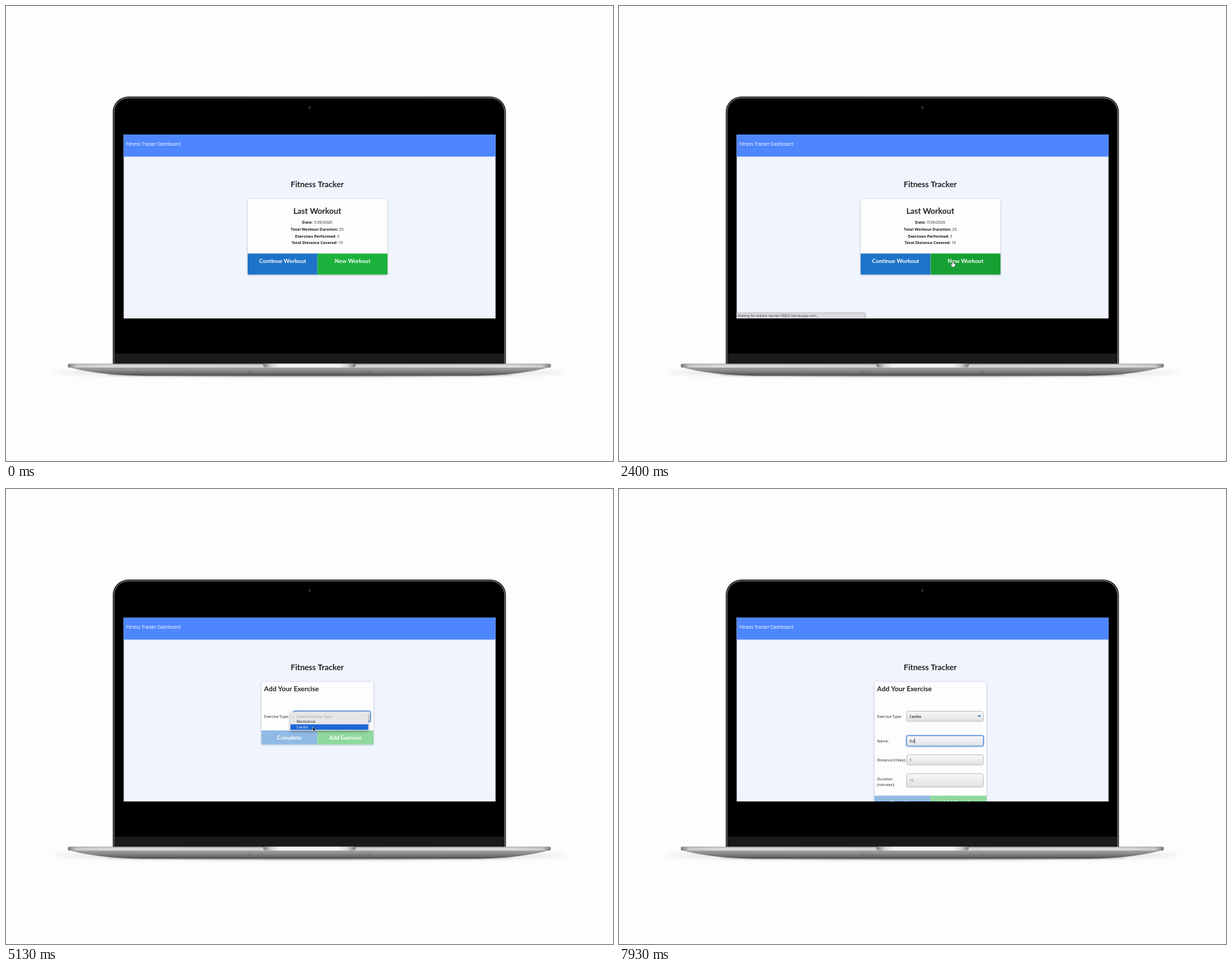
These frames come from a looping animation (864 px wide and 648 px high, 8 s). An HTML page with a canvas:

```html
<!DOCTYPE html>
<html lang="en">
<head>
<meta charset="utf-8">
<title>Fitness Tracker</title>
<style>
html, body { margin: 0; width: 100%; height: 100%; overflow: hidden; background: #fdfcfe; }
canvas { display: block; width: 864px; height: 648px; }
</style>
</head>
<body>
<canvas id="stage" width="864" height="648"></canvas>
<script>
const ctx = document.getElementById('stage').getContext('2d');
const LOOP = 8000;
const HEAD = 'Lato, sans-serif';
const BODY = '"Open Sans", sans-serif';
const HOST = 'radiant-hamlet-39822.herokuapp.com';

// Moments of the story in ms
const T = { enter: 70, hover: 470, link: 930, wait: 2000, page: 2670, fade: 3850, gone: 4250,
  open: 4470, pick: 5300, focus: 6600, type: 7250, second: 7530 };

// Pointer path: start, end, from, to
const MOVES = [
  [70, 600, [674, 419], [475, 364]],
  [3000, 3800, [475, 364], [478, 324]],
  [4540, 5060, [478, 324], [437, 339]],
  [5480, 6270, [437, 339], [441, 356]]
];

const ease = p => p * p * (3 - 2 * p);
const clamp = v => Math.min(1, Math.max(0, v));

function pointerAt(t) {
  let pos = MOVES[0][2];
  for (const [start, end, from, to] of MOVES) {
    if (t < start) break;
    const p = ease(clamp((t - start) / (end - start)));
    pos = from.map((v, i) => v + (to[i] - v) * p);
  }
  return pos;
}

function rect(x, y, w, h, fill) {
  ctx.fillStyle = fill;
  ctx.fillRect(x, y, w, h);
}

function round(x, y, w, h, r, fill, stroke, line = 1) {
  ctx.beginPath();
  ctx.roundRect(x, y, w, h, r);
  if (fill) { ctx.fillStyle = fill; ctx.fill(); }
  if (stroke) { ctx.strokeStyle = stroke; ctx.lineWidth = line; ctx.stroke(); }
}

function ramp(x0, y0, x1, y1, ...stops) {
  const g = ctx.createLinearGradient(x0, y0, x1, y1);
  stops.forEach(([at, color]) => g.addColorStop(at, color));
  return g;
}

function text(str, x, y, font, color = '#222', align = 'left') {
  ctx.font = font;
  ctx.fillStyle = color;
  ctx.textAlign = align;
  ctx.fillText(str, x, y);
}

const heading = (str, x, y, size, color, align) => text(str, x, y, `bold ${size}px ${HEAD}`, color, align);
const label = (str, x, y, color = '#222') => text(str, x, y, `500 5.4px ${BODY}`, color);

function drawLid() {
  round(152, 129, 559.5, 381, [22, 22, 0, 0], '#0c0e0d');
  round(153.7, 130.8, 556.1, 381, [20.4, 20.4, 0, 0], '#000', '#b9c1bd', .8);
  rect(155, 495, 553.5, 15, '#1b1a1b');
  ctx.beginPath();
  ctx.arc(432, 144.5, 2, 0, 7);
  ctx.fillStyle = '#29292c';
  ctx.fill();
}

function drawShadow(rx, y, ry, blur, alpha) {
  ctx.save();
  ctx.filter = `blur(${blur}px)`;
  ctx.beginPath();
  ctx.ellipse(432, y, rx, ry, 0, 0, 7);
  ctx.fillStyle = `rgba(0,0,0,${alpha})`;
  ctx.fill();
  ctx.restore();
}

function drawBase() {
  drawShadow(365, 522, 4, 3, .14);
  drawShadow(290, 524.5, 3, 1.6, .45);

  ctx.beginPath();
  ctx.moveTo(88, 514);
  ctx.bezierCurveTo(112, 521, 150, 526.5, 205, 526.5);
  ctx.lineTo(658, 526.5);
  ctx.bezierCurveTo(714, 526.5, 750, 521, 775.5, 514);
  ctx.closePath();
  ctx.fillStyle = ramp(0, 514, 0, 527, [0, '#a6a6a7'], [.4, '#8b8b8c'], [.75, '#666667'], [1, '#424243']);
  ctx.fill();

  round(88, 509.8, 687.5, 5.2, [1, 1, 2, 2], ramp(88, 0, 775.5, 0, [0, '#777'], [.018, '#c8c8c9'],
    [.08, '#d9d9da'], [.5, '#d0d0d1'], [.92, '#d9d9da'], [.982, '#c8c8c9'], [1, '#777']));
  rect(90, 509.6, 684, .8, '#8d8d8e');
  round(366, 509.5, 132, 5.3, [0, 0, 4, 4], ramp(366, 0, 498, 0, [0, '#777'], [.09, '#d5d5d5'],
    [.18, '#f4f4f4'], [.82, '#f4f4f4'], [.91, '#d5d5d5'], [1, '#777']));
  rect(345, 520, 5, 1, '#666667');
  rect(514, 520, 5, 1, '#666667');
}

function drawCard(x, y, w, h) {
  ctx.save();
  ctx.shadowColor = 'rgba(40,50,70,.4)';
  ctx.shadowBlur = 2.5;
  ctx.shadowOffsetY = .5;
  round(x, y, w, h, 1.5, '#fdfcfe');
  ctx.restore();
}

function drawButtons(x, y, w, h, base, names, colors) {
  names.forEach((name, i) => {
    rect(x + i * w / 2, y, w / 2, h, colors[i]);
    heading(name, x + (i + .5) * w / 2, base, 8.1, '#fff', 'center');
  });
}

function drawStat(name, value, y) {
  const bold = `bold 5.6px ${BODY}`, plain = `500 5.6px ${BODY}`;
  ctx.font = bold;
  const nameWidth = ctx.measureText(name).width;
  ctx.font = plain;
  const x = 443 - (nameWidth + ctx.measureText(' ' + value).width) / 2;
  text(name, x, y, bold, '#1c1c1e');
  text(' ' + value, x + nameWidth, y, plain, '#222');
}

function drawSummary(t) {
  drawCard(344, 274.5, 199, 108);
  heading('Last Workout', 443, 296, 11.3, '#222', 'center');
  [['Date:', '7/29/2020'], ['Total Workout Duration:', '25'],
    ['Exercises Performed:', '3'], ['Total Distance Covered:', '15']]
    .forEach(([name, value], i) => drawStat(name, value, 310.4 + i * 9.6));
  drawButtons(344, 352.5, 199, 30, 366.3, ['Continue Workout', 'New Workout'],
    ['#1d73c7', t >= T.hover ? '#16a034' : '#1cb13d']);
}

function drawField(y, h, focused) {
  if (focused) round(409, y, 110, h, 2.5, null, 'rgba(90,155,235,.6)', 2);
  round(409.5, y + .5, 109, h - 1, 2,
    ramp(0, y, 0, y + h, [0, '#f8f8f9'], [.5, '#ededef'], [1, '#dfdfe2']), focused ? '#4f88cc' : '#b7b7bc', .8);
}

function drawSelect(value, focused) {
  drawField(316, 15.5, focused);
  text(value, 413.5, 325.6, `600 5.3px ${BODY}`, '#222');
  ctx.beginPath();
  ctx.moveTo(510.5, 322.3);
  ctx.lineTo(515.3, 322.3);
  ctx.lineTo(512.9, 325);
  ctx.fillStyle = '#2f64ad';
  ctx.fill();
}

function drawMenu(t) {
  ctx.save();
  ctx.shadowColor = 'rgba(0,0,0,.4)';
  ctx.shadowBlur = 4;
  ctx.shadowOffsetY = 1;
  round(405, 318, 110.5, 26, 1.5, '#e6e6e8');
  ctx.restore();
  const row = t < 4680 ? 0 : t < 4870 ? 1 : 2;
  if (row) rect(405, 327.4 + (row - 1) * 7.8, 110.5, 7.8, '#1c66d6');
  label('✓', 407, 325.6, '#a2a2a6');
  label('Select Exercise Type', 413.5, 325.6, '#a2a2a6');
  label('Resistance', 413.5, 333.2, row === 1 ? '#fff' : '#222');
  label('Cardio', 413.5, 340.9, row === 2 ? '#fff' : '#222');
}

function drawDetails(t) {
  const focused = t >= T.focus;
  const typed = t >= T.second ? 'Ru' : t >= T.type ? 'R' : '';
  label('Name:', 367.3, 360.8);
  drawField(351, 15.5, focused);
  label(typed || 'Running', 413.5, 360.8, typed ? '#222' : '#75757a');
  if (focused) {
    const caret = 413.7 + ctx.measureText(typed).width;
    rect(caret, 355.2, .8, 7, '#222');
  }
  label('Distance (miles):', 367.3, 387.9);
  drawField(378, 15.5);
  label('5', 413.5, 387.9, '#75757a');
  label('Duration', 367.3, 415.4);
  label('(minutes):', 367.3, 423);
  drawField(405, 20);
  label('10', 413.5, 417, '#75757a');
}

function drawForm(t) {
  const full = t >= T.pick;
  const top = full ? 436.7 : 343.8;
  drawCard(363.5, 274.5, 159.5, top + 20 - 274.5);
  heading('Add Your Exercise', 367.3, 288.3, 9.7);
  label('Exercise Type:', 367.3, 325.7);
  drawSelect(full ? 'Cardio' : 'Select Exercise Type', t >= T.open && t < T.focus);
  if (full) drawDetails(t);
  drawButtons(363.5, top, 159.5, 20, top + 13.2, ['Complete', 'Add Exercise'], ['#90bae3', '#8fd99e']);
  if (t >= T.open && !full) drawMenu(t);
}

function drawStatus(t) {
  if (t < T.link || t >= T.gone) return;
  const waiting = t >= T.wait;
  ctx.save();
  ctx.globalAlpha = clamp((t - T.link) / 130 + .3) * clamp((T.gone - t) / (T.gone - T.fade));
  round(166, 437, waiting ? 184.7 : 129.5, 10, [0, 2, 0, 0], '#dcdde1', '#aeb1b8', .9);
  text(waiting ? `Waiting for ${HOST}...` : `https://${HOST}/exercise`, 169, 443,
    `${waiting ? 4.85 : 5}px ${BODY}`, '#444');
  ctx.restore();
}

function outline(points, fill, stroke) {
  ctx.beginPath();
  points.forEach(([x, y]) => ctx.lineTo(x, y));
  ctx.closePath();
  ctx.lineJoin = 'round';
  ctx.strokeStyle = stroke;
  ctx.lineWidth = 1;
  ctx.stroke();
  ctx.fillStyle = fill;
  ctx.fill();
}

function drawPointer(t) {
  if (t < T.enter || t >= T.type) return;
  const [x, y] = pointerAt(t);
  ctx.save();
  ctx.translate(x, y);
  if (t >= 6070) {
    rect(-.4, -3.2, .8, 6.4, '#444');
    rect(-1.4, -3.6, 2.8, .6, '#555');
    rect(-1.4, 3, 2.8, .6, '#555');
  } else if (t >= T.hover && t < T.page) {
    outline([[-.6, 0], [.6, 0], [.8, 2.4], [3.6, 3.2], [3.4, 5.6], [2.5, 7.4], [-.7, 7.4],
      [-2.7, 4.4], [-2, 3.6], [-.7, 4.5]], '#f4f4f4', '#222');
  } else {
    outline([[0, 0], [0, 5.3], [1.2, 4.3], [2, 6.2], [2.9, 5.8], [2.1, 3.9], [3.7, 3.8]], '#111', 'rgba(255,255,255,.9)');
  }
  ctx.restore();
}

function drawScreen(t) {
  ctx.save();
  ctx.beginPath();
  ctx.rect(167.5, 183, 529.3, 262);
  ctx.clip();
  rect(167, 183, 531, 262, '#f0f4fd');
  rect(167, 183, 531, 31.5, '#4d86fd');
  text('Fitness Tracker Dashboard', 171, 199.3, `500 6.25px ${BODY}`, '#fff');
  heading('Fitness Tracker', 443, 258, 11.3, '#222', 'center');
  if (t < T.page) drawSummary(t); else drawForm(t);
  drawStatus(t);
  drawPointer(t);
  ctx.restore();
}

function frame(now) {
  rect(0, 0, 864, 648, '#fdfcfe');
  drawLid();
  drawBase();
  drawScreen(now % LOOP);
  requestAnimationFrame(() => frame(performance.now()));
}

frame(0);
</script>
</body>
</html>
```
